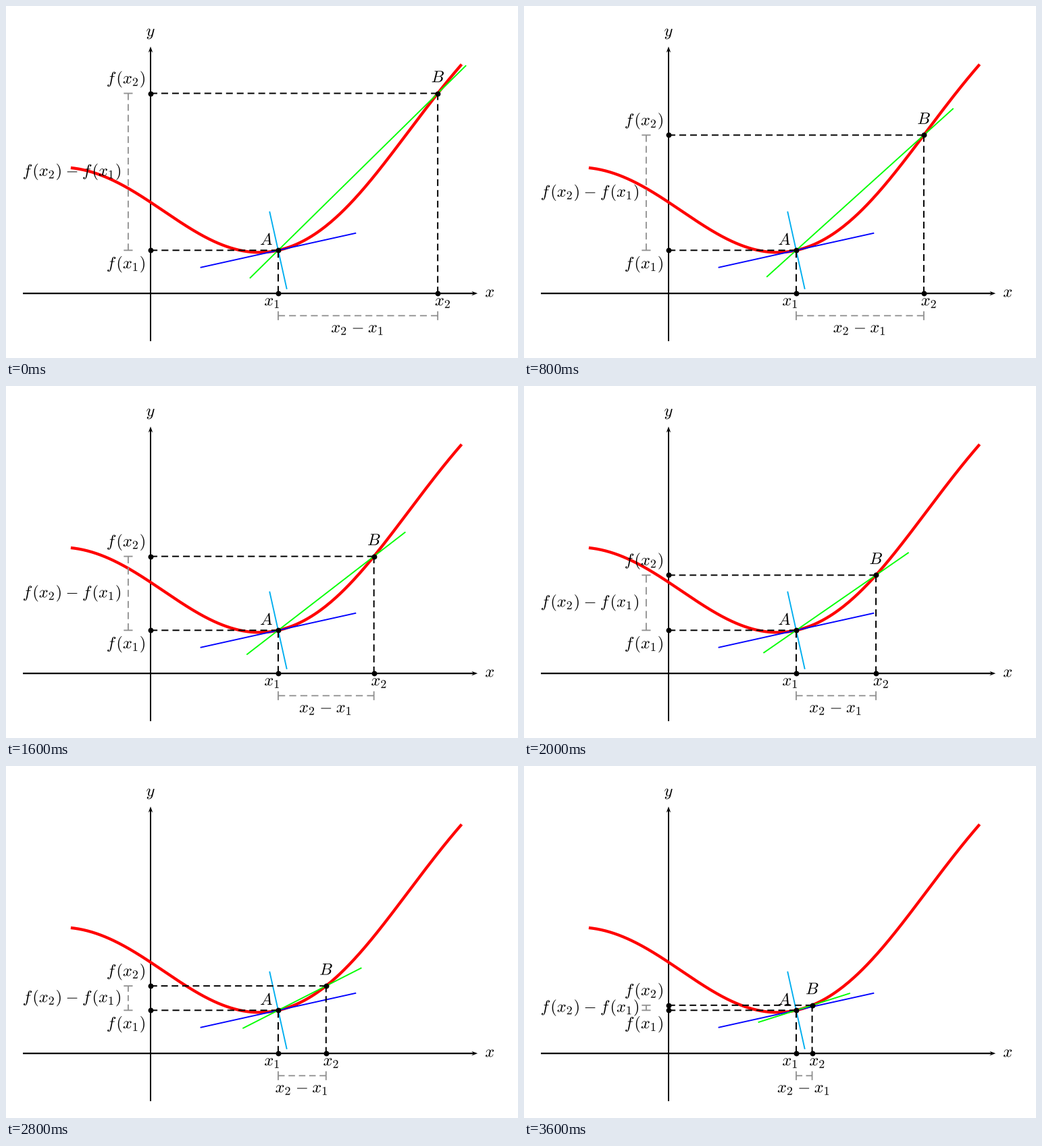
A matplotlib script that plays this animation: 758 px wide and 522 px high, repeating every 3.8 s.

```python
import numpy as np
import matplotlib as mpl
import matplotlib.pyplot as plt
from matplotlib.animation import FuncAnimation
from matplotlib.patches import PathPatch
from matplotlib.path import Path
from matplotlib.textpath import TextPath
from matplotlib.transforms import Affine2D

mpl.rcParams["mathtext.fontset"] = "cm"

W, H, DPI = 758, 522, 64
OX, OY = 214.0, 426.2        # origin of the axes, in pixels from the top left
U = 47.24                    # pixels per unit
EM = 24.4
FRAMES, INTERVAL = 19, 200
PX = 72 / DPI
GRAY = "#949494"

fig = plt.figure(figsize=(W / DPI, H / DPI), dpi=DPI, facecolor="white")
ax = fig.add_axes([0, 0, 1, 1])
ax.set_xlim(-OX, W - OX)
ax.set_ylim(OY - H, OY)
ax.axis("off")


# --- drawing helpers (pixels relative to the origin, y up) ---

def line(color, width=1.9, z=3, xs=(), ys=()):
    art, = ax.plot(xs, ys, color=color, lw=width * PX, zorder=z,
                   solid_capstyle="butt", snap=False)
    return art


def dashed(p, q, on=10.0, off=6.0):
    """Dashes fitted so that the line begins and ends with a full dash."""
    p, q = np.array(p, float), np.array(q, float)
    length = np.hypot(*(q - p))
    n = max(0, round((length - on) / (on + off)))
    total = n * (on + off) + on
    pts = []
    for k in range(n + 1):
        a = k * (on + off) / total
        b = (k * (on + off) + on) / total
        pts += [p + a * (q - p), p + b * (q - p), (np.nan, np.nan)]
    return np.array(pts)


def join(*parts):
    return np.vstack(parts).T


def bezier(p0, p1, p2, p3, n=200):
    t = np.linspace(0, 1, n)[:, None]
    p0, p1, p2, p3 = map(np.array, (p0, p1, p2, p3))
    return ((1 - t) ** 3 * p0 + 3 * t * (1 - t) ** 2 * p1
            + 3 * t ** 2 * (1 - t) * p2 + t ** 3 * p3)


ADVANCE = {"f": 0.598, "(": 0.389, ")": 0.389, "x": 0.572, "y": 0.526,
           "A": 0.75, "B": 0.809, "1": 0.448, "2": 0.448, "-": 1.222}


class Label:
    """A formula set glyph by glyph; digits become subscripts."""

    def __init__(self, text, anchor):
        pen, glyphs = 0.0, []
        for ch in text:
            sub = ch.isdigit()
            size = EM * (0.73 if sub else 1)
            x = pen + (0.222 if ch == "-" else 0)
            y = -0.15 if sub else 0
            shape = TextPath((0, 0), f"${ch}$", size=size)
            glyphs.append(Affine2D().translate(x * EM, y * EM)
                          .transform_path(shape))
            pen += ADVANCE[ch]
        self.shift = -anchor * pen * EM
        self.place = Affine2D()
        ax.add_patch(PathPatch(Path.make_compound_path(*glyphs), fc="black",
                               ec="none", lw=0, zorder=8,
                               transform=self.place + ax.transData))

    def at(self, x, y):
        self.place.clear().translate(x + self.shift, y)
        return self


def arrow_head(x, y, dx, dy, length=9.2, half=3.4, inset=3.6):
    back = np.array([x, y]) - length * np.array([dx, dy])
    side = half * np.array([-dy, dx])
    notch = back + inset * np.array([dx, dy])
    ax.fill(*np.array([(x, y), back + side, notch, back - side]).T,
            color="black", lw=0, zorder=2)


# --- fixed parts ---

A = np.array([4.0, 1.353])
SLOPE = 0.2217
left = bezier((-2.5, 3.942), (-0.1, 3.70), A - 2.4 * np.array([1, SLOPE]), A)
right = bezier(A, A + 2.15 * np.array([1, SLOPE]), (7.647, 4.77), (9.75, 7.19))
curve = np.vstack([left, right[1:]]) * U
ax_px, ay_px = A * U

X_END, Y_END = 10.25 * U, 7.75 * U
line("black", 2.2, 1, [-4 * U, X_END - 5], [0, 0])
line("black", 2.0, 1, [0, 0], [-1.5 * U, Y_END - 5])
arrow_head(X_END, 0, 1, 0)
arrow_head(0, Y_END, 0, 1)

line("#ff0000", 4.3, 2.5, *curve.T)

along = np.array([1, SLOPE]) / np.hypot(1, SLOPE)
across = np.array([-along[1], along[0]])
for color, d in (("#00aeef", 1.25 * U * across), ("#0000ff", 2.5 * U * along)):
    line(color, z=3, xs=[ax_px - d[0], ax_px + d[0]],
         ys=[ay_px - d[1], ay_px + d[1]])

line("black", 2, 5, *join(dashed((0, ay_px), (ax_px, ay_px)),
                          dashed((ax_px, ay_px), (ax_px, 0))))

Label("x", 0).at(709.3 - OX, -5.2)
Label("y", 0.5).at(0, OY - 44.5)
Label("A", 0).at(376.2 - OX, OY - 354.2)
Label("f(x1)", 1).at(-6.7, ay_px - 26.9)
Label("x1", 0.5).at(ax_px - 8.2, OY - 444.2)

# --- moving parts ---

secant = line("#00ff00", z=4)
guides = line("black", 2, 5)
spans = line(GRAY, z=5)
dots, = ax.plot([], [], "o", color="black", ms=7.9 * PX, mew=0, zorder=7)
name_b = Label("B", 0.5)
name_x2 = Label("x2", 0.5)
name_fx2 = Label("f(x2)", 1)
name_dx = Label("x2-x1", 0.5)
name_dy = Label("f(x2)-f(x1)", 1)

GAP = -0.7 * U               # distance of the measuring lines from the axes
TICK = 6.6


def tick(x, y, dx, dy):
    return [(x - dx, y - dy), (x + dx, y + dy), (np.nan, np.nan)]


def update(i):
    bx = (9 - 0.25 * i) * U
    by = np.interp(bx, *curve.T)
    a, b = np.array([ax_px, ay_px]), np.array([bx, by])

    ext = 1.25 * U * (b - a) / np.hypot(*(b - a))
    secant.set_data(*np.array([a - ext, b + ext]).T)
    guides.set_data(*join(dashed((0, by), (bx, by)), dashed((bx, by), (bx, 0))))
    spans.set_data(*join(
        dashed((ax_px, GAP), (bx, GAP)), dashed((GAP, ay_px), (GAP, by)),
        tick(ax_px, GAP, 0, TICK), tick(bx, GAP, 0, TICK),
        tick(GAP, ay_px, TICK, 0), tick(GAP, by, TICK, 0)))
    dots.set_data([ax_px, ax_px, 0, bx, bx, 0], [ay_px, 0, ay_px, by, 0, by])

    name_b.at(bx + 0.3, by + 16.4)
    name_x2.at(bx + 8.2, OY - 444.2)
    name_fx2.at(-6.7, by + 14.7)
    name_dx.at((ax_px + bx) / 2, OY - 484.1)
    name_dy.at(171.4 - OX, (ay_px + by) / 2 - 6.1)
    return []


anim = FuncAnimation(fig, update, frames=FRAMES, interval=INTERVAL,
                     init_func=lambda: update(0), repeat=True, repeat_delay=0)
plt.show()
```
